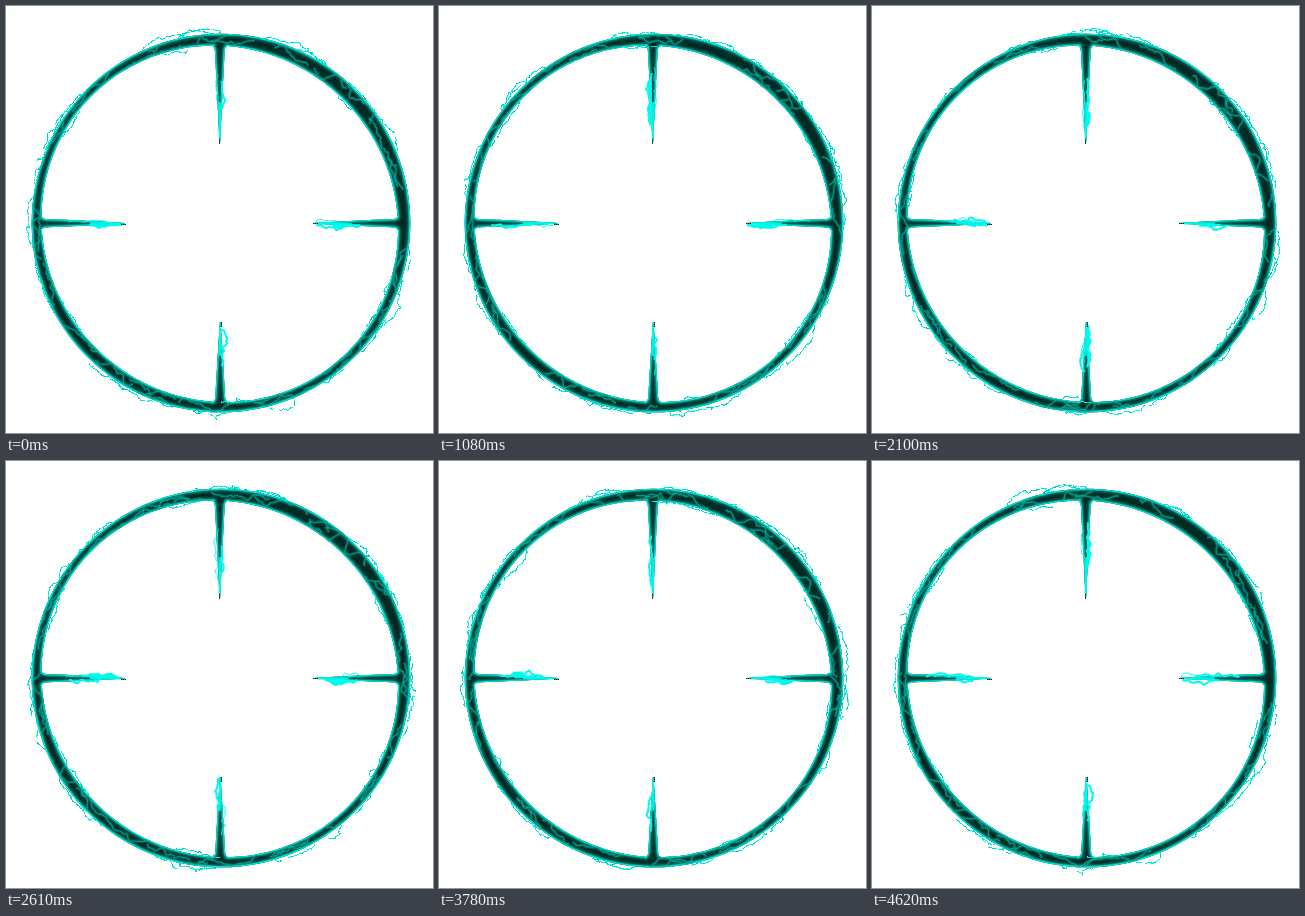
An HTML page with a canvas for the animation above (4.65 s loop, 427 by 427 pixels).

```html
<!DOCTYPE html>
<html lang="en">
<head>
<meta charset="utf-8">
<title>Electric crosshair</title>
<style>
  html, body { margin: 0; width: 100%; height: 100%; overflow: hidden; background: #fff; }
  canvas { display: block; width: 427px; height: 427px; }
</style>
</head>
<body>
<canvas id="stage" width="427" height="427"></canvas>
<script>
const ctx = document.getElementById('stage').getContext('2d');
const SIZE = 427, FRAME_MS = 30, FRAMES = 155, LIFE = 5;
const CX = 215, CY = 217, RADIUS = 189.3, TAU = Math.PI * 2;
const OUTER_ARCS = 20, INNER_ARCS = 6, VEINS = 30;
const CYAN = '#00f4e4', TEAL = '#00c9b8';
const TIPS = [92, 99, 96, 80];          // right, bottom, left, top
const SHIFT = [0.3, 0.8, -0.3, -1.2];   // sideways offset of each needle

const { sin, cos, floor, PI } = Math;
const hash = (a, b = 0) => {
  const v = sin(a * 127.1 + b * 311.7 + 17.3) * 43758.5453;
  return v - floor(v);
};
const noise = (x, seed) => {
  const i = floor(x), f = x - i, s = f * f * (3 - 2 * f);
  return hash(i, seed) * (1 - s) + hash(i + 1, seed) * s;
};
// Fractal noise in about -1..1
const jag = (x, seed) =>
  (noise(x, seed) - .5) * 1.3 + (noise(x * 2.3, seed + 5) - .5) * .5 + (noise(x * 5, seed + 9) - .5) * .2;

const thickness = a => 11.1 - 2.8 * sin(2 * a) + 1.3 * cos(a) - .9 * sin(a);
const innerRadius = a => RADIUS - thickness(a);
const polar = (r, a) => [CX + r * cos(a), CY + r * sin(a)];

// Point on needle k: distance from the centre, and sideways offset
function needlePoint(k, dist, side) {
  const a = k * PI / 2, s = side + SHIFT[k];
  return [CX + dist * cos(a) - s * sin(a), CY + dist * sin(a) + s * cos(a)];
}

function buildInner() {
  const path = new Path2D();
  for (let k = 0; k < 4; k++) {
    const a = k * PI / 2, base = innerRadius(a), wide = k % 2 ? 4.8 : 4;
    const at = (d, s) => needlePoint(k, d, s);
    if (k) path.lineTo(...at(base, -wide - 3));
    else path.moveTo(...at(base, -wide - 3));
    path.quadraticCurveTo(...at(base - 1, -wide), ...at(base - 7, -wide));
    path.quadraticCurveTo(...at(base - 40, -3), ...at(TIPS[k], -.3));
    path.lineTo(...at(TIPS[k], .3));
    path.quadraticCurveTo(...at(base - 40, 3), ...at(base - 7, wide));
    path.quadraticCurveTo(...at(base - 1, wide), ...at(base, wide + 3));
    for (let b = a + .05; b < a + PI / 2 - .04; b += .02) path.lineTo(...polar(innerRadius(b), b));
  }
  path.closePath();
  return path;
}

const inner = buildInner();
const outer = new Path2D();
outer.arc(CX, CY, RADIUS, 0, TAU);
const body = new Path2D(outer);
body.addPath(inner);

function trace(points) {
  ctx.beginPath();
  points.forEach(p => ctx.lineTo(...p));
}

function stroke(width, color, path) {
  ctx.lineWidth = width;
  ctx.strokeStyle = color;
  if (path) ctx.stroke(path);
  else ctx.stroke();
}

function dot([x, y], color) {
  ctx.fillStyle = color;
  ctx.fillRect(Math.round(x), Math.round(y), 1, 1);
}

// Each filament is reborn every LIFE frames with a fresh seed
function spark(id, frame) {
  const clock = (frame + id * 7) % FRAMES;
  const seed = id * 37 + floor(clock / LIFE) * 3.7;
  const age = (clock % LIFE + .5) / LIFE;
  return { seed, age, swell: .55 + .45 * sin(PI * age), rnd: n => hash(seed, n + .5) };
}

function drawBody(frame) {
  ctx.save();
  ctx.clip(body, 'evenodd');
  ctx.fillStyle = '#002a24';
  ctx.fillRect(0, 0, SIZE, SIZE);
  for (const edge of [outer, inner]) {
    stroke(9, 'rgba(0,110,97,.25)', edge);
    stroke(6, 'rgba(0,140,125,.4)', edge);
    stroke(3.8, 'rgba(0,185,168,.6)', edge);
    stroke(2.1, '#00e6d6', edge);
  }
  for (let i = 0; i < VEINS; i++) drawVein(spark(i + 100, frame), i / VEINS);
  ctx.restore();
}

function drawVein({ seed, age, rnd }, slot) {
  const start = (slot + rnd(1) * .06) * TAU + age * .04, span = .12 + rnd(2) * .22;
  const points = [];
  for (let u = 0; u <= 1; u += .025) {
    const a = start + span * u, len = span * u * RADIUS;
    const depth = thickness(a) * (.5 + .85 * jag(len / 13 + age, seed));
    points.push(polar(RADIUS - depth, a + jag(len / 10, seed + 3) * .014));
  }
  trace(points);
  stroke(3.4, 'rgba(0,140,124,.32)');
  stroke(1.2, 'rgba(0,180,162,.7)');
}

function drawArc({ seed, age, swell, rnd }, slot, outward) {
  const start = (slot + rnd(1) * .08) * TAU + age * .03, span = .1 + rnd(2) * .28;
  const peak = (2.5 + rnd(3) * 5.5) * swell * (outward ? 1 : .7);
  const length = span * RADIUS;
  for (let d = 0; d < length; d += .5) {
    if (noise(d / 5, seed + 21) < .14) continue;
    const bow = Math.sqrt(sin(PI * d / length));
    const lift = Math.min(9, peak * bow * (.65 + jag(d / 9 + age, seed)) + jag(d / 4, seed + 7) * 1.2);
    if (lift < 0) continue;
    const a = start + d / RADIUS + jag(d / 6 + age, seed + 13) * .025;
    const r = outward ? RADIUS + lift : innerRadius(a) - lift;
    dot(polar(r, a), hash(floor(d), seed) < .7 ? CYAN : TEAL);
  }
}

function drawNeedleSparks(k, frame) {
  const base = innerRadius(k * PI / 2), reach = base - TIPS[k];
  // Bright skin toward the tip
  trace([needlePoint(k, TIPS[k] + 5, 0), needlePoint(k, TIPS[k] + reach * .42, .4)]);
  stroke(2.2, 'rgba(0,250,236,.9)');

  for (let i = 0; i < 3; i++) {
    const { seed, age, swell, rnd } = spark(200 + k * 5 + i, frame);
    if (rnd(1) < .25) continue;
    const from = TIPS[k] + reach * rnd(2) * .35;
    const length = reach * (.22 + rnd(3) * .34);
    const side = rnd(4) < .5 ? -1 : 1, peak = (3 + rnd(5) * 4) * swell;
    const points = [];
    for (let d = 0; d <= length; d += 1) {
      const bow = Math.sqrt(sin(PI * d / length));
      const off = side * (1 + peak * bow * (.7 + jag(d / 6 + age, seed)));
      points.push(needlePoint(k, from + d + jag(d / 4, seed + 4) * 2, off));
    }
    trace(points);
    if (i === 0 && rnd(6) < .75) {
      ctx.fillStyle = '#00fff2';
      ctx.fill();
    }
    stroke(i === 2 ? 1 : 2, '#00faeb');
  }
  for (let d = 0; d < 5; d++) dot(needlePoint(k, TIPS[k] + d, -.4), d % 2 ? '#087c73' : '#082e2a');
}

function render(time) {
  const frame = floor(time / FRAME_MS) % FRAMES;
  ctx.fillStyle = '#fff';
  ctx.fillRect(0, 0, SIZE, SIZE);
  ctx.lineJoin = 'round';
  drawBody(frame);
  for (let i = 0; i < OUTER_ARCS; i++) drawArc(spark(i, frame), i / OUTER_ARCS, true);
  for (let i = 0; i < INNER_ARCS; i++) drawArc(spark(i + 30, frame), i / INNER_ARCS, false);
  for (let k = 0; k < 4; k++) drawNeedleSparks(k, frame);
}

const begin = performance.now();
function tick() {
  render(performance.now() - begin);
  requestAnimationFrame(tick);
}
tick();
</script>
</body>
</html>
```
